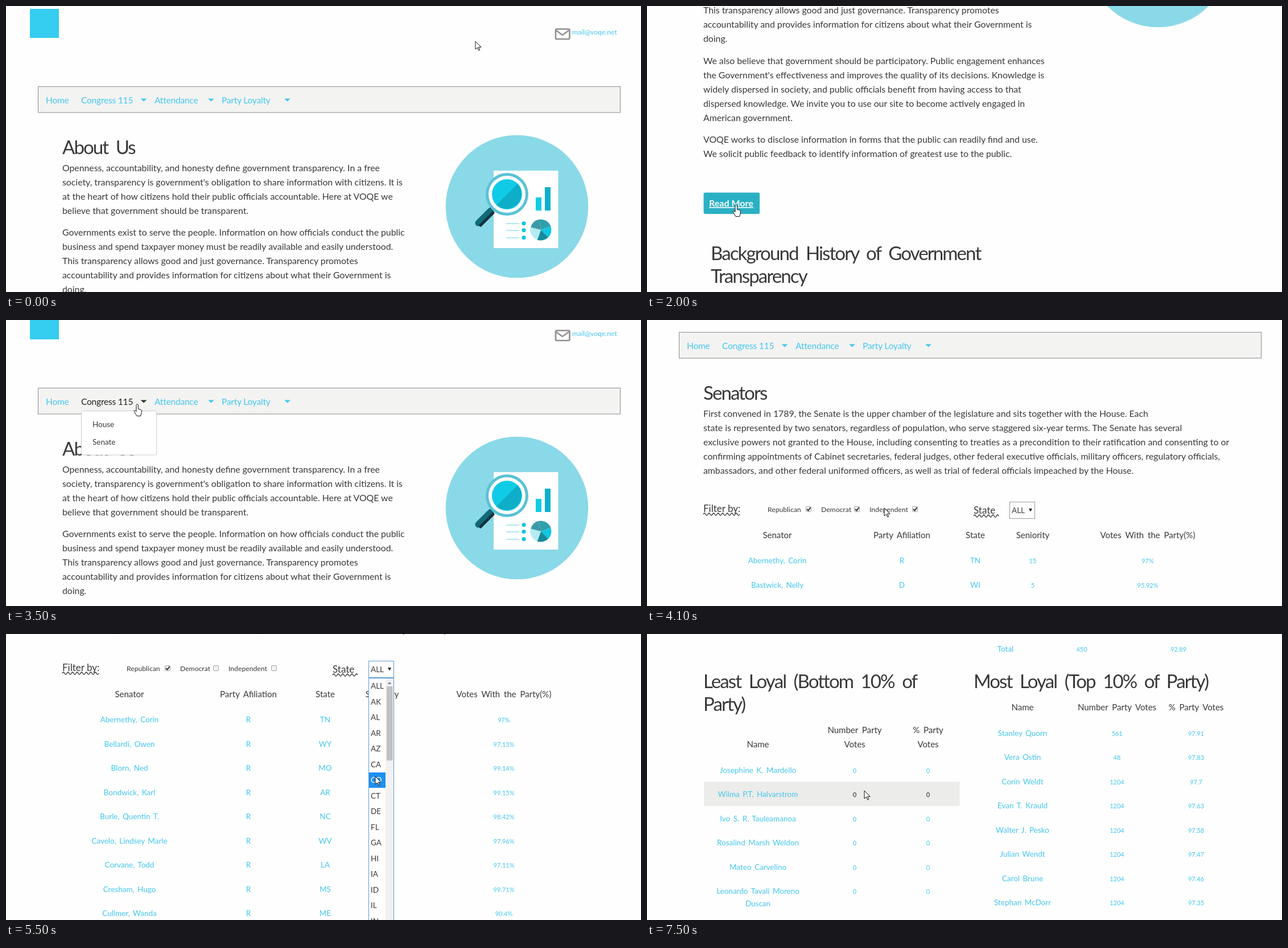
These frames come from a looping animation (1116x502 px, 8.5 s). An HTML page:

```html
<!DOCTYPE html>
<html lang="en">
<head>
<meta charset="utf-8">
<title>Government transparency site</title>
<style>
  html, body { margin: 0; width: 100%; height: 100%; overflow: hidden; background: #fefefe; }
  svg { display: block; }
  text { font-family: Lato, "Open Sans", sans-serif; fill: #383838; }
  .body { font-size: 15.8px; }
  .head { font-size: 33px; letter-spacing: -1.9px; word-spacing: 7px; }
  .nav { font-size: 15.5px; letter-spacing: -.2px; }
  .th { font-size: 15px; word-spacing: 3px; }
  .td { font-size: 13.5px; word-spacing: 2px; }
  .val { font-size: 11px; }
  .small { font-size: 12.2px; }
  .label { font-size: 17px; }
  .btn { font-size: 16px; font-weight: 700; text-decoration: underline; }
  .mid { text-anchor: middle; }
  text.cyan { fill: #45c6ee; }
  text.white { fill: #fff; }
  text.dark { fill: #222; }
</style>
</head>
<body>
<svg id="stage" width="1116" height="502" viewBox="0 0 1116 502"></svg>
<script>
const CYAN = '#45c6ee', LINE = 25, ROW = 42.5;

// Text is placed by the middle of its line.
const text = (x, y, s, cls) => `<text x="${x}" y="${y + 5}" class="${cls}">${s}</text>`;
const mid = (x, y, s, cls) => text(x, y, s, cls + ' mid');
const rect = (x, y, w, h, fill, more = '') =>
  `<rect x="${x}" y="${y}" width="${w}" height="${h}" fill="${fill}" ${more}/>`;
const circle = (x, y, r, fill) => `<circle cx="${x}" cy="${y}" r="${r}" fill="${fill}"/>`;
const path = (d, fill, more = '') => `<path d="${d}" fill="${fill}" ${more}/>`;
const shift = (y, s) => `<g transform="translate(0 ${y})">${s}</g>`;
const lines = (x, y, list) => list.map((s, i) => text(x, y + i * LINE, s, 'body')).join('');
const heading = (x, y, s) => text(x, y + 9, s, 'head');

const bar = y => rect(56.5, y + .5, 1023, 45.5, '#f3f3f2', 'stroke="#8c8c8c"');
const footer = y => bar(y) + mid(568, y + 19, '2019 VOQE | All Rights Reserved.', 'body');
const caret = (x, fill) => path(`M${x - 5.5} 162.500h11l-5.500 5z`, fill);

function header(menu) {
  const item = menu ? 'dark' : 'cyan';
  return rect(42, 5, 51, 51, '#35cdf0') +
    rect(966, 40.5, 24.500, 17.500, 'none', 'rx="2" stroke="#8f8f8f" stroke-width="2.600"') +
    path('M967 43l11 8 11-8', 'none', 'stroke="#8f8f8f" stroke-width="2.400"') +
    text(995, 45, 'mail@voqe.net', 'small cyan') +
    bar(141) +
    text(70, 166, 'Home', 'nav cyan') +
    text(132, 166, 'Congress 115', 'nav ' + item) + caret(242, menu ? '#333' : CYAN) +
    text(261, 166, 'Attendance', 'nav cyan') + caret(360.5, CYAN) +
    text(379, 166, 'Party Loyalty', 'nav cyan') + caret(494.5, CYAN);
}

const menuBox = rect(132.5, 181.500, 132, 77.500, '#fff', 'rx="3" stroke="#ccc"') +
  text(152, 205, 'House', 'td') + text(152, 236, 'Senate', 'td');

function slice(from, to, fill) {
  const p = a => [940 + 18.500 * Math.cos(a * Math.PI / 180), 393 + 18.500 * Math.sin(a * Math.PI / 180)];
  return path(`M940 393L${p(from)}A18.5 18.5 0 0 1 ${p(to)}z`, fill);
}

const picture =
  circle(898, 352, 125.300, '#8ad9e8') + rect(857, 289, 113.500, 136, '#fff') +
  rect(931, 336, 10, 23, '#12cbe6') + rect(947, 318, 10, 41, '#0eb0ca') +
  path('M830 381L852 359', 'none', 'stroke="#0f6a79" stroke-width="11" stroke-linecap="round"') +
  path('M834 385L856 363', 'none', 'stroke="#14333f" stroke-width="5" stroke-linecap="round"') +
  circle(880.5, 330.5, 37.500, '#5bc2d5') + circle(880.5, 330.5, 32.500, '#fff') +
  circle(880.5, 330.5, 26.500, '#10cbe6') +
  path('M899.200 311.800A26.5 26.5 0 0 1 861.800 349.200z', '#0eaec9') +
  [381, 393, 406].map(y => rect(879, y, 23, 1.800, '#a9e6ef') + circle(910, y + .5, 3.600, '#12c5e0')).join('') +
  slice(-100, -20, '#2f9fae') + slice(-20, 45, '#10c6e0') + slice(45, 110, '#158a9c') +
  slice(110, 195, '#b5ebf2') + slice(195, 260, '#3c9aa8');

const aboutText = heading(99, 246, 'About Us') +
  lines(99, 285, [
    'Openness, accountability, and honesty define government transparency. In a free',
    "society, transparency is government's obligation to share information with citizens. It is",
    'at the heart of how citizens hold their public officials accountable. Here at VOQE we',
    'believe that government should be transparent.']) +
  lines(99, 398, [
    'Governments exist to serve the people. Information on how officials conduct the public',
    'business and spend taxpayer money must be readily available and easily understood.',
    'This transparency allows good and just governance. Transparency promotes',
    'accountability and provides information for citizens about what their Government is',
    'doing.']) +
  lines(99, 537, [
    'We also believe that government should be participatory. Public engagement enhances',
    "the Government's effectiveness and improves the quality of its decisions. Knowledge is",
    'widely dispersed in society, and public officials benefit from having access to that',
    'dispersed knowledge. We invite you to use our site to become actively engaged in',
    'American government.']) +
  lines(99, 675, [
    'VOQE works to disclose information in forms that the public can readily find and use.',
    'We solicit public feedback to identify information of greatest use to the public.']) +
  rect(99.5, 767.5, 98.5, 37.5, '#2ab0c5', 'rx="3"') + text(109, 787, 'Read More', 'btn white');

const history = heading(112, 872, 'Background History of Government') +
  heading(112, 912, 'Transparency') +
  lines(112, 962, [
    'The idea that citizens should be able to see how they are governed is an old',
    'one. Early assemblies met in the open, and their records were read aloud so',
    'that all could hear what had been decided. As printing spread, written reports',
    'of debates and votes made it possible for people far away to follow the work',
    'of their representatives, and to judge for themselves whether they had been',
    'well served.']) +
  lines(112, 1126, [
    'Over time, many countries passed laws that gave the public a right to ask for',
    'government records. These laws rest on the belief that information gathered',
    'with public money belongs to the public, and that secrecy should be limited',
    'to those cases where it is truly needed. Open meetings, published budgets and',
    'recorded votes have since become a normal part of public life in many',
    'places.']) +
  lines(112, 1290, [
    'Today most records are kept in electronic form and can be shared at little',
    'cost. Open data lets anyone study how votes are cast and how money is spent.',
    'It also makes it easier for citizens to compare the record of each member',
    'with the promises made before an election. Good tools turn long lists of',
    'numbers into something that everybody can read, and so help to keep the',
    'government close to the people.']);

const about = (scroll, { menu, open } = {}) => shift(-scroll,
  header(menu) + picture + aboutText +
  (open ? history + footer(1470) : footer(858)) + (menu ? menuBox : ''));

const senators = [
  ['Abernethy, Corin', 'R', 'TN', 15, 97], ['Bastwick, Nelly', 'D', 'WI', 5, 95.92],
  ['Bellardi, Owen', 'R', 'WY', 11, 97.13], ['Bexley, Stephan', 'D', 'CO', 9, 92.31],
  ['Birkenthorp, Leonard', 'D', 'CT', 7, 92.5], ['Blorn, Ned', 'R', 'MO', 7, 99.14],
  ['Bodmer, Finn', 'D', 'NJ', 5, 86.32], ['Bondwick, Karl', 'R', 'AR', 7, 99.15],
  ['Brask, Everett', 'D', 'OH', 11, 95.41], ['Burle, Quentin T.', 'R', 'NC', 13, 98.42],
  ['Cavelo, Lindsey Marle', 'R', 'WV', 3, 97.96], ['Corvane, Todd', 'R', 'LA', 3, 97.11],
  ['Cresham, Hugo', 'R', 'MS', 39, 99.71], ['Cullmer, Wanda', 'R', 'ME', 21, 90.4],
  ['Jarvo, Neil', 'D', 'AL', 1, 81.37], ['Sandwell, Kurt', 'R', 'AL', 21, 90.48],
  ['Skerne, Leonard P.', 'R', 'AL', 31, 97.79], ['Stovell, Conrad', 'R', 'AL', 1, 97.25]];

const wave = (x, y, n) => path(`M${x} ${y}q2 -4 4 0` + 't4 0'.repeat(n), 'none', 'stroke="#333" stroke-width="1.300"');
const checkbox = (x, on) => rect(x + .5, 447.500, 9, 9, '#f1f1f1', 'rx="1.500" stroke="#a5a5a5"') +
  (on ? path(`M${x + 2} 452l2.500 2.500 4-5.500`, 'none', 'stroke="#333" stroke-width="2"') : '');

const stateList = rect(637.5, 469.500, 44, 440, '#fff', 'stroke="#5b9bd5"') +
  rect(667, 470, 14, 440, '#f1f1f1') + rect(669, 484, 10.500, 130, '#c1c1c1') +
  path('M670.500 480l3.500-4 3.500 4z', '#888') +
  rect(638, 635, 29, 27, '#1e90f0') +
  'ALL AK AL AR AZ CA CO CT DE FL GA HI IA ID IL IN'.split(' ')
    .map((s, i) => text(641, 483 + i * 27.5, s, 'td' + (s === 'CO' ? ' white' : ''))).join('');

const wide = [229, 448, 577, 678, 880], medium = [217, 426, 561, 661, 875], narrow = [207, 408, 547, 655, 870];

// parties: the ticked party letters
function senate(scroll, { parties = 'RDI', state = 'ALL', cols = wide, hot = -1, open } = {}) {
  const rows = senators.filter(r => parties.includes(r[1]) && (state === 'ALL' || r[2] === state));
  const cells = rows.map((r, i) => {
    const y = 542 + i * ROW;
    return (i === hot ? rect(100, y - 21.5, 924, ROW, '#ececea') : '') + r.map((v, c) =>
      mid(cols[c], y, c === 4 ? v + '%' : v, (c < 3 ? 'td' : 'val') + (i === hot && c ? ' dark' : ' cyan'))).join('');
  }).join('');
  return shift(-scroll, header() + heading(99, 246, 'Senators') +
    lines(99, 285, [
      'First convened in 1789, the Senate is the upper chamber of the legislature and sits together with the House. Each',
      'state is represented by two senators, regardless of population, who serve staggered six-year terms. The Senate has several',
      'exclusive powers not granted to the House, including consenting to treaties as a precondition to their ratification and consenting to or',
      'confirming appointments of Cabinet secretaries, federal judges, other federal executive officials, military officers, regulatory officials,',
      'ambassadors, and other federal uniformed officers, as well as trial of federal officials impeached by the House.']) +
    text(99, 452, 'Filter by:', 'label') + wave(99, 461, 15) +
    [['Republican', 212, 279], ['Democrat', 306, 364], ['Independent', 391, 466]].map(([s, x, box]) =>
      text(x, 452, s, 'small') + checkbox(box, parties.includes(s[0]))).join('') +
    text(574, 455, 'State', 'label') + wave(574, 464, 10) +
    rect(637.5, 439.500, 44, 29, '#fff', `stroke="${open ? '#5b9bd5' : '#999'}"`) +
    text(641, 454, state, 'td') + path('M671 451h6l-3 5.500z', '#222') +
    ['Senator', 'Party Afiliation', 'State', 'Seniority', 'Votes With the Party(%)']
      .map((s, c) => mid(cols[c], 498, s, 'th')).join('') +
    cells + footer(542 + (rows.length - 1) * ROW + 61) + (open ? stateList : ''));
}

const table = (y, cols, rows, hot = -1) => rows.map((r, i) => r.map((v, c) =>
  mid(cols[c], y + i * ROW, v, (c ? 'val' : 'td') + (i === hot && c ? ' dark' : ' cyan'))).join('')).join('');

const rankings =
  heading(574, -195, 'House at a Glance') +
  ['Party', 'Number of Reps', '% Voted with Party'].map((s, c) => mid([630, 764, 934][c], -146, s, 'th')).join('') +
  table(26 - 3 * ROW, [630, 764, 934], [['Republican', 247, 93.3], ['Democrat', 203, 92.39], ['Independent', 0, 0], ['Total', 450, 92.89]]) +
  heading(99, 81, 'Least Loyal (Bottom 10% of') + heading(99, 121, 'Party)') +
  mid(195, 194, 'Name', 'th') + mid(365, 169, 'Number Party', 'th') + mid(365, 194, 'Votes', 'th') +
  mid(494, 169, '% Party', 'th') + mid(494, 194, 'Votes', 'th') +
  rect(100, 259.500, 449.500, ROW, '#ececea') +
  table(238.5, [195, 365, 494], ['Josephine K. Mardello', 'Wilma P.T. Halvarstrom', 'Ivo S. R. Tauleamanoa',
    'Rosalind Marsh Weldon', 'Mateo Carvelino', 'Leonardo Tavali Moreno'].map(s => [s, 0, 0]), 1) +
  mid(195, 473, 'Duscan', 'td cyan') +
  heading(574, 81, 'Most Loyal (Top 10% of Party)') +
  ['Name', 'Number Party Votes', '% Party Votes'].map((s, c) => mid([660, 826, 965][c], 129, s, 'th')).join('') +
  table(173.5, [660, 826, 965], [['Stanley Quorn', 561, 97.91], ['Vera Ostin', 48, 97.83],
    ['Corin Weldt', 1204, 97.7], ['Evan T. Krauld', 1204, 97.63], ['Walter J. Pesko', 1204, 97.58],
    ['Julian Wendt', 1204, 97.47], ['Carol Brune', 1204, 97.46], ['Stephan McDorr', 1204, 97.35]]);

const loyalty = scroll => shift(-scroll, header() + heading(99, 246, 'Party Loyalty') +
  lines(99, 285, [
    'Those who follow politics often speak of party loyalty: how',
    'often the members of a party vote the same way as the',
    'majority of that party. Some see it as a sign of unity,',
    'others as a sign that members do not think for themselves.',
    'The tables on this page show how often each member has',
    'voted with the party.']) + shift(441, rankings));

const cursor = (x, y, d) => `<g transform="translate(${x} ${y})">${path(d, '#fff', 'stroke="#111" stroke-linejoin="round"')}</g>`;
const arrow = (x, y) => cursor(x, y, 'M0 0v14l3.500-3 2.300 5 2-1-2.300-4.800h4.600z');
const hand = (x, y) => cursor(x, y, 'M-2 1.500a1.700 1.700 0 0 1 3.400 0V8l5 1.500q1.500 .5 1.200 2.500l-1 5-1.200 3.500h-6.500L-5.500 13q-1-2.500 1-2.500l2.500 2z');

const scenes = [
  [0, about(0) + arrow(825, 62)],
  [500, about(256) + arrow(825, 62)],
  [1000, about(440) + hand(157, 349)],
  [2000, about(440, { open: true }) + hand(157, 349)],
  [2500, about(820, { open: true }) + arrow(640, 330)],
  [3000, about(1052, { open: true }) + arrow(640, 330)],
  [3500, about(22, { menu: true }) + hand(231, 148)],
  [4000, senate(0) + arrow(175, 214)],
  [4100, senate(120) + arrow(417, 330)],
  [4600, senate(392, { hot: 4 }) + arrow(417, 330)],
  [4800, senate(392, { parties: 'RI', cols: medium }) + arrow(369, 60)],
  [5000, senate(392, { parties: 'R', cols: medium }) + arrow(470, 60)],
  [5500, senate(392, { parties: 'R', cols: medium, open: true }) + arrow(649, 250)],
  [6000, senate(269.5, { parties: 'R', state: 'AL', cols: narrow }) + arrow(369, 183)],
  [6500, senate(312, { parties: 'RD', state: 'AL', cols: narrow }) + arrow(349, 188)],
  [7000, loyalty(0) + arrow(460, 250)],
  [7500, loyalty(441) + arrow(382, 275)]];

const stage = document.getElementById('stage');
let shown;
function draw() {
  const t = performance.now() % 8500;
  const scene = scenes.findLast(s => s[0] <= t);
  if (scene !== shown) stage.innerHTML = (shown = scene)[1];
  requestAnimationFrame(draw);
}
draw();
</script>
</body>
</html>
```
